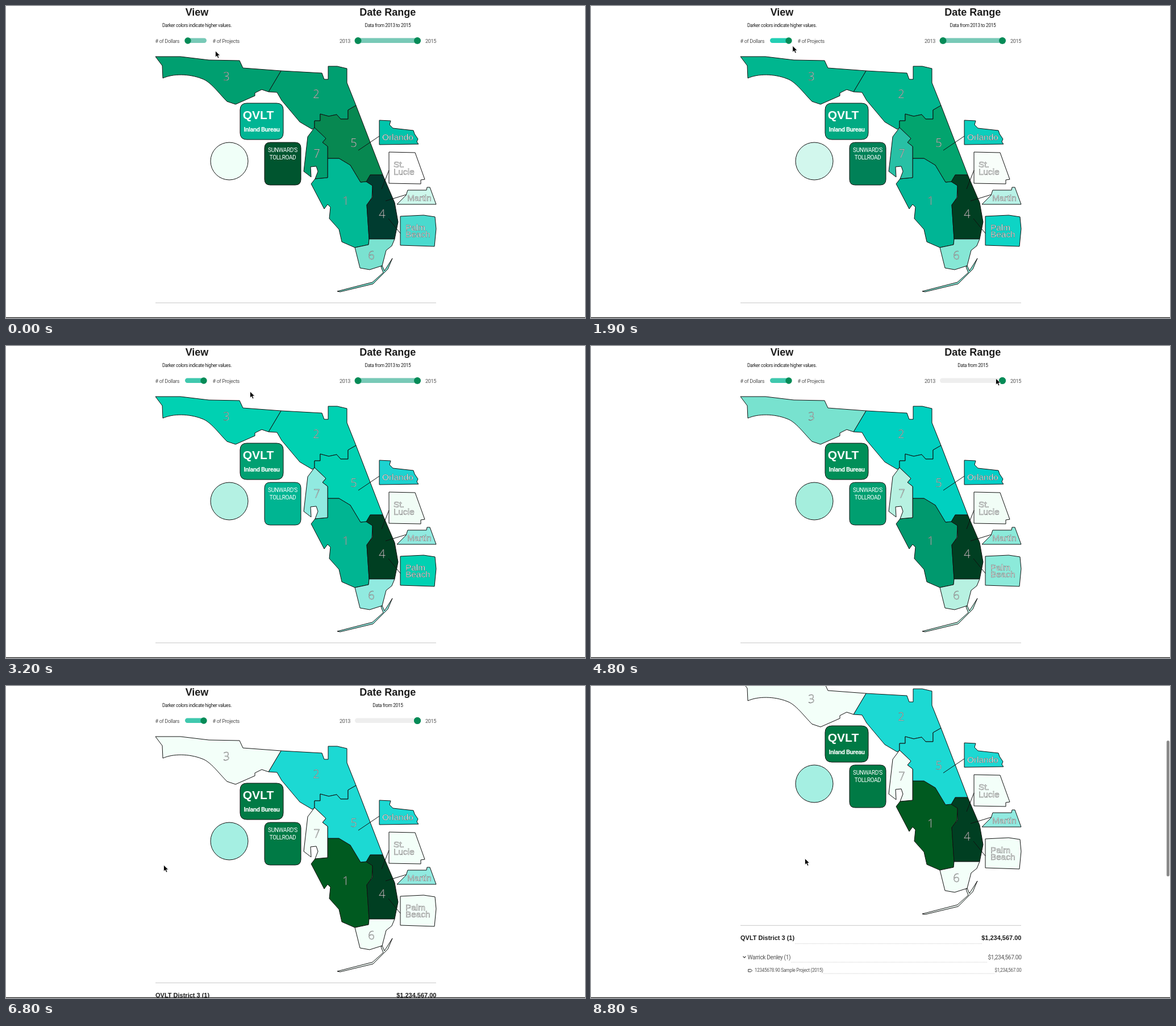
These frames come from a looping animation (1019x549 px, 8.9 s). An HTML page:

```html
<!DOCTYPE html>
<html lang="en">
<head>
<meta charset="utf-8">
<title>District map</title>
<style>
  html, body { margin: 0; width: 100%; height: 100%; overflow: hidden; background: #fff; }
  svg { display: block; width: 100%; height: 100%; }
  text { font-family: "Liberation Sans", Arial, sans-serif; fill: #1c1c1c; }
  .bold { font-weight: 700; }
  .slim { font-family: Roboto, sans-serif; letter-spacing: -.037em; }
  .soft { fill: #555; }
  .mid { text-anchor: middle; }
  .end { text-anchor: end; }
  .area { stroke: #111; stroke-width: 1; stroke-linejoin: round; }
  .num { font: 300 20px "Open Sans", sans-serif; text-anchor: middle; }
  .num, .place { fill: #fff; stroke: #666; stroke-width: .5px; }
  .place { font-size: 15.4px; }
  .sign { fill: #fff; text-anchor: middle; }
  .dots { stroke: #bbb; stroke-width: .8; stroke-dasharray: 1 1; }
  .lead { stroke: #111; stroke-width: 1; fill: none; }
</style>
</head>
<body>
<svg viewBox="0 0 1019 549" preserveAspectRatio="none">
  <defs>
    <filter id="shade" x="-20%" y="-20%" width="140%" height="150%">
      <feDropShadow dx="0" dy="2" stdDeviation="2.5" flood-color="#000" flood-opacity=".4"/>
    </filter>
  </defs>
  <g id="page">
    <text class="bold mid" font-size="18" x="336" y="17">View</text>
    <text class="slim mid" font-size="8.3" x="336" y="37.3">Darker colors indicate higher values.</text>
    <text class="slim soft" font-size="9.1" x="262.5" y="64.5">#&#160;of Dollars</text>
    <text class="slim soft" font-size="9.1" x="363.5" y="64.5">#&#160;of Projects</text>
    <rect id="toggle" x="315" y="56.5" width="38" height="8.5" rx="4.2"/>
    <circle id="knob" cy="61" r="5.7" fill="#058b57"/>

    <text class="bold mid" font-size="18" x="671.7" y="17">Date Range</text>
    <text id="span" class="slim mid" font-size="8.3" x="672" y="37.3"></text>
    <text class="slim soft" font-size="9.1" x="587" y="64.5">2013</text>
    <text class="slim soft" font-size="9.1" x="738" y="64.5">2015</text>
    <rect x="614" y="56.5" width="116" height="8.5" rx="4.2" fill="#eee"/>
    <rect id="range" y="56.5" height="8.5" rx="4.2" fill="#78c9b7"/>
    <circle id="from" cy="61" r="6" fill="#058b57"/>
    <circle cx="724" cy="61" r="6" fill="#058b57"/>

    <g id="map"></g>
    <path class="lead" d="M620 254L657 229M661 322L674 289M668 343L704 332M673 374L694 400"/>
    <g id="labels"></g>

    <path d="M263 522.3H757" stroke="#d2d2d2" stroke-width="1.3"/>
    <g id="rows">
      <text class="bold" font-size="11" x="263" y="547.7">QVLT District 3 (1)</text>
      <text class="bold end" font-size="11" x="757.5" y="547.7">$1,234,567.00</text>
      <path class="dots" d="M359 554.3H688M352 587H698M409 607H710"/>
      <path d="M267.5 576.7l2.5 2.5l2.5 -2.5" fill="none" stroke="#333" stroke-width="1.2"/>
      <text class="slim soft" font-size="10.2" x="275.5" y="582">Warrick Denley (1)</text>
      <text class="slim soft end" font-size="10.2" x="757.5" y="582">$1,234,567.00</text>
      <path d="M276.8 599.5h4.7l2.2 2.2l-2.2 2.2h-4.7z" fill="none" stroke="#333" stroke-width="1"/>
      <text class="slim soft" font-size="8.15" x="288" y="604">12345678.90 Sample Project (2015)</text>
      <text class="slim soft end" font-size="8.15" x="757.5" y="604">$1,234,567.00</text>
    </g>
  </g>
  <g id="tip">
    <rect x="375.5" y="107.5" width="102" height="52.5" rx="1" fill="#fff" filter="url(#shade)"/>
    <text class="bold" font-size="11" x="386" y="129.3">QVLT District 3</text>
    <text class="slim" font-size="8.3" x="386" y="148.3">$2,136,499.92</text>
  </g>
  <rect id="bar" x="1013" width="5" height="239" rx="2.5" fill="#8a8a8a"/>
  <path d="M0 548.4H1019" stroke="#222" stroke-width="1.3"/>
  <path id="cursor" d="M0 0V11.2L2.6 8.8L4.5 13L6.5 12.1L4.7 8.1H8.2Z" fill="#000" stroke="#fff" stroke-width=".8"/>
</svg>
<script>
const $ = id => document.getElementById(id);
const LOOP = 8900;

// Outline and the fill colours it passes through at TIMES.
const TIMES = [0, 500, 1450, 2300, 3000, 4150, 4800, 5700];
const STOPS = [0, 1, 1, 2, 3, 3, 4, 5];
const AREAS = [
  ["M566 268L586 268L606 280L624 310L634 309L645 316L644 337L635 350L639 410L638 420L614 425L591 415L586 393L569 374L571 354L566 349L560 357L537 313L544 304L566 302Z",
    "00b995 00b595 00b595 00b592 00996e 005a20"],
  ["M484 114L556 118L560 129L567 129L567 106L583 106L600 110L600 135L616 175L602 183L602 199L589 199L582 191L568 194L553 190L553 202L543 202L543 214L539 217L517 204L485 166L477 152L462 151Z",
    "009f70 00a072 00caa9 00d1b2 00d0c0 1cd9d3"],
  ["M263 89L307 89L357 95L411 96L417 109L484 114L462 151L450 147L438 153L438 158L404 173L389 168C374 153 360 133 345 128C322 119 294 119 276 127L275 105Z",
    "009f70 00a072 00caa9 00d1b2 78e2cf f3fff9"],
  ["M641 297L663 297L684 346L690 380L684 410L639 410L635 350L645 337L645 316L634 309Z",
    "003c30 003f22 003f22 003f22 003f22 003f22"],
  ["M616 175L663 297L641 297L634 309L624 310L606 280L586 268L566 268L566 247L557 240L563 233L543 214L543 202L553 202L553 190L568 194L582 191L589 199L602 199L602 183Z",
    "078851 059045 00b592 00d1b2 00d0c0 1cd9d3"],
  ["M614 425L638 420L639 410L684 410L679 422L669 430L662 457L640 464L623 461ZM583 502L645 486L664 469L660 459L662 457L666 466L680 444L672 463L646 489L588 503Z",
    "7ae2d0 79e2d0 91ebd9 91eae0 b7f1e1 f3fff9"],
  ["M543 214L563 233L557 240L566 247L566 302L544 304L549 291L546 282L536 283L537 301L524 291L531 230Z",
    "009f70 00a072 4cddd3 91eae0 b7f1e1 f3fff9"],
  ["M424 171H476Q488 171 488 183V223Q488 235 476 235H424Q412 235 412 223V183Q412 171 424 171Z",
    "00b594 00b594 00a072 00a072 008f58 007a45"],
  ["M360 273a33 33 0 1 0 66 0a33 33 0 1 0 -66 0Z",
    "f0fff8 f3fdf9 b4f1e3 b4f1e3 a5eedd a5efe2"],
  ["M465 240H509Q519 240 519 250V305Q519 315 509 315H465Q455 315 455 305V250Q455 240 465 240Z",
    "00552f 00551c 00a78c 00b592 009f70 007a45"],
  ["M657 201L677 202L675 209L681 215L717 219L719 225L725 234L723 239L726 243L657 244Z",
    "00c4ab 00c9b0 17d3c8 1cd3d0 00d0c8 1cd9d3"],
  ["M674 257L720 258L737 305L730 306L730 313L674 312Z",
    "ffffff ffffff f1fdf6 f1fdf6 f1fdf6 f3fff9"],
  ["M688 349L704 333L707 324L740 324L741 319L746 319L757 349Z",
    "cef8ec cff5ec a5f0e2 91eae0 8ceada 91eae0"],
  ["M694 370L735 368L755 371L757 392L754 423L694 421Z",
    "49dace 1cd9d3 00cfb8 00d1b2 8ceada f3fff9"]
];
const TOGGLE = "78c9b7 4bceb0 00d0b8 40c8ae 40c8ae 40c8ae";

const LABELS = [
  ["num", 598, 350, "1"], ["num", 546, 162, "2"], ["num", 388, 131, "3"],
  ["num", 662, 373, "4"], ["num", 612, 248, "5"], ["num", 643, 446, "6"], ["num", 547, 267, "7"],
  ["place", 662, 236, "Orlando"], ["place", 682, 284, "St."], ["place", 682, 297, "Lucie"],
  ["place", 706, 343, "Martin"], ["place", 703, 395, "Palm"], ["place", 703, 407, "Beach"],
  ["sign bold", 444, 199, "QVLT", 21], ["sign slim bold", 450, 220.5, "Inland Bureau", 11],
  ["sign slim", 487, 257, "SUNWARD'S", 10], ["sign slim", 487, 269.5, "TOLLROAD", 10]
];

// time, x, y of the pointer tip
const PATH = [
  [0, 368.5, 79], [350, 385, 112], [700, 385, 108], [1100, 344, 65], [1350, 332, 59], [1600, 340, 61],
  [2300, 377.5, 84], [3200, 429.5, 80], [3700, 617, 59], [3850, 617, 59], [4450, 713, 58], [4800, 712.5, 57],
  [5600, 395, 115], [5950, 392, 118], [6800, 277.5, 315], [7200, 330, 310], [7800, 376.5, 303.5], [LOOP, 376.5, 303.5]
];

const make = (parent, tag, attrs, text = "") => {
  const el = document.createElementNS("http://www.w3.org/2000/svg", tag);
  for (const k in attrs) el.setAttribute(k, attrs[k]);
  el.textContent = text;
  return parent.appendChild(el);
};
const set = (id, attrs) => { for (const k in attrs) $(id).setAttribute(k, attrs[k]); };
const mix = (a, b, p) => a + (b - a) * p;
const ramp = (t, a, b) => Math.min(1, Math.max(0, (t - a) / (b - a)));
const ease = p => p * p * (3 - 2 * p);
const rgb = hex => [0, 2, 4].map(i => parseInt(hex.substr(i, 2), 16));
const parse = list => list.split(" ").map(rgb);

function colorAt(list, t) {
  let i = TIMES.length - 1;
  while (t < TIMES[i]) i--;
  const j = Math.min(i + 1, TIMES.length - 1);
  const p = i === j ? 0 : ramp(t, TIMES[i], TIMES[j]);
  const a = list[STOPS[i]], b = list[STOPS[j]];
  return `rgb(${a.map((v, k) => Math.round(mix(v, b[k], p)))})`;
}

function pointAt(t) {
  let i = 0;
  while (i < PATH.length - 2 && t >= PATH[i + 1][0]) i++;
  const [t0, x0, y0] = PATH[i], [t1, x1, y1] = PATH[i + 1];
  const p = ease(ramp(t, t0, t1));
  return [mix(x0, x1, p), mix(y0, y1, p)];
}

const areas = AREAS.map(([d, colors]) => ({ el: make($("map"), "path", { class: "area", d }), colors: parse(colors) }));
const toggleColors = parse(TOGGLE);
for (const [cls, x, y, text, size] of LABELS)
  make($("labels"), "text", size ? { class: cls, x, y, "font-size": size } : { class: cls, x, y }, text);

function draw(t) {
  for (const a of areas) a.el.setAttribute("fill", colorAt(a.colors, t));
  set("toggle", { fill: colorAt(toggleColors, t) });
  set("knob", { cx: mix(320, 348, ease(ramp(t, 1400, 1550))) });

  // The range handle snaps from year to year.
  const step = ease(ramp(t, 3950, 4040)) + ease(ramp(t, 4200, 4290));
  const x = mix(619.5, 724, step / 2);
  const year = 2013 + Math.round(step);
  set("from", { cx: x });
  set("range", { x: x - 5.5, width: 735.5 - x, opacity: step < 2 ? 1 : 0 });
  $("span").textContent = year < 2015 ? `Data from ${year} to 2015` : "Data from 2015";

  set("tip", { opacity: ramp(t, 300, 450) * (1 - ramp(t, 1150, 1300)) });
  set("rows", { opacity: t >= 5950 ? 1 : 0 });

  const scroll = 101 * ease(ramp(t, 6850, 7200));
  set("page", { transform: `translate(0 ${-scroll})` });
  set("bar", { y: 52 + scroll * .436, opacity: ramp(t, 6850, 6950) });
  set("cursor", { transform: `translate(${pointAt(t)})` });
}

const start = performance.now();
function tick() {
  draw((performance.now() - start) % LOOP);
  requestAnimationFrame(tick);
}
tick();
</script>
</body>
</html>
```
